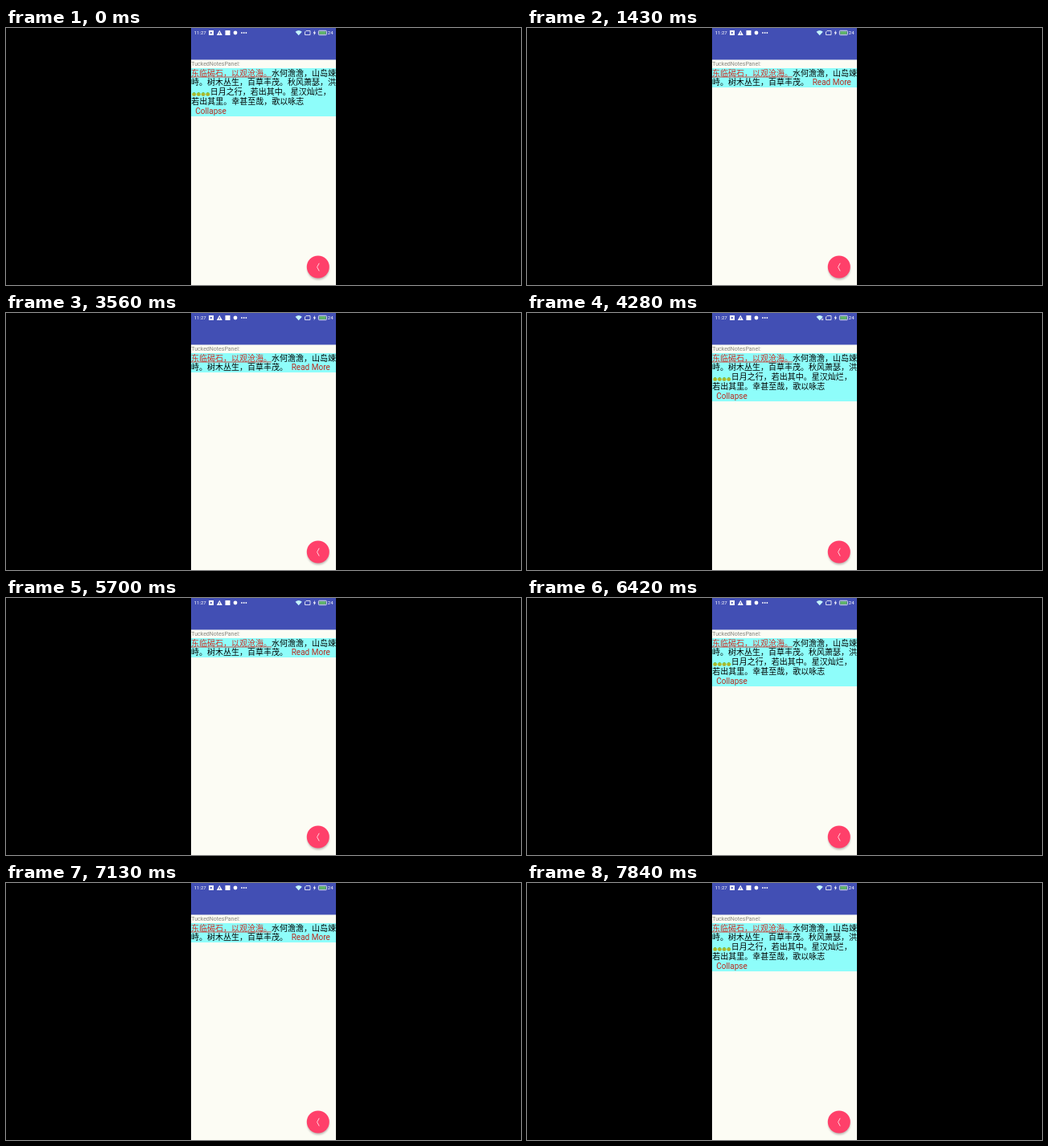
An HTML page for the animation above (8 s loop, 640 by 320 pixels).

```html
<!DOCTYPE html>
<html lang="zh-CN">
<head>
<meta charset="utf-8">
<title>Expandable text</title>
<style>
  html, body { margin: 0; width: 100%; height: 100%; overflow: hidden; background: #000; }
  svg { display: block; width: 100%; height: 100%; }
  text { font-family: Roboto, "Noto Sans CJK SC", "Noto Sans CJK", sans-serif; }
  .poem { font-size: 10px; fill: #000; font-family: "Noto Sans CJK SC", "Noto Sans CJK", sans-serif; }
  .link { fill: #cc2f28; }
  .toggle { font-size: 10px; fill: #b82a20; }
  .status { font-size: 6px; fill: #fff; }
  .line { fill: none; stroke: #fff; stroke-width: .8; }

  .expanded { animation: expanded 8s step-end infinite; }
  .collapsed { animation: collapsed 8s step-end infinite; }
  .traffic { animation: traffic 8s step-end infinite; }

  @keyframes expanded {
    0%, 53.5%, 80.25%, 98%, 100% { opacity: 1; }
    17.875%, 71.25%, 89.125% { opacity: 0; }
  }
  @keyframes collapsed {
    0%, 53.5%, 80.25%, 98%, 100% { opacity: 0; }
    17.875%, 71.25%, 89.125% { opacity: 1; }
  }
  @keyframes traffic {
    0%, 62.375%, 100% { opacity: 0; }
    53.5% { opacity: 1; }
  }
</style>
</head>
<body>
<svg viewBox="0 0 640 320">
  <defs>
    <filter id="soft" x="-30%" y="-30%" width="160%" height="160%">
      <feGaussianBlur stdDeviation="1.2"/>
    </filter>
    <g id="emoji">
      <ellipse cx="2.9" cy="3.6" rx="2.6" ry="2.2" fill="#b9c832"/>
      <path d="M.8 2.6Q2.9 -.6 5 2.6Z" fill="#6fae35"/>
      <path d="M1.5 4.5h2.8" stroke="#8b7a22" stroke-width=".7"/>
    </g>
  </defs>

  <rect width="640" height="320" fill="#000"/>
  <rect x="230" width="180" height="320" fill="#fcfcf4"/>
  <rect x="230" width="180" height="39.5" fill="#424fb4"/>

  <!-- Status bar -->
  <text class="status" x="233.7" y="8.2">11:27</text>
  <g fill="#fff">
    <rect x="252" y="3" width="6" height="6"/>
    <path d="M265.3 2.8l3.5 6.2h-7z"/>
    <rect x="272.5" y="3" width="6" height="6"/>
    <circle cx="285" cy="6" r="2.4"/>
    <circle cx="293" cy="6" r=".9"/>
    <circle cx="295.7" cy="6" r=".9"/>
    <circle cx="298.4" cy="6" r=".9"/>
    <path d="M384 2.8l-2.4 3.6h1.5l-.5 2.8 2.5-3.8h-1.6z"/>
    <path d="M359.6 4.8q4.1-3.6 8.2 0L363.7 9.2z" fill="#c4f3fa"/>
  </g>
  <path d="M254 4.4l2.6 1.6-2.6 1.6z" fill="#424fb4"/>
  <path d="M265.3 5v2.8" stroke="#424fb4" stroke-width=".8"/>
  <path class="line traffic" d="M366.2 6.8v2.4M367.7 6.8v2.4"/>
  <path class="line" d="M373 3.5h5v5h-6.5v-3.5z"/>
  <rect class="line" x="388.4" y="3.3" width="10" height="5.4" rx="1"/>
  <rect x="389.3" y="4.2" width="8.2" height="3.6" fill="#63b968"/>
  <text class="status" x="399.8" y="8.2">24</text>

  <text x="230.3" y="47.2" font-size="7" fill="#85857f">TuckedNotesPanel:</text>

  <g class="expanded">
    <rect x="230" y="50" width="180" height="60" fill="#8efdfa"/>
    <text class="poem" x="230" y="71.4">峙。树木丛生，百草丰茂。秋风萧瑟，洪</text>
    <use href="#emoji" x="230.8" y="79"/>
    <use href="#emoji" x="236.5" y="79"/>
    <use href="#emoji" x="242.2" y="79"/>
    <use href="#emoji" x="247.9" y="79"/>
    <text class="poem" x="253.7" y="83.2">日月之行，若出其中。星汉灿烂，</text>
    <text class="poem" x="230.3" y="95.1">若出其里。幸甚至哉，歌以咏志</text>
    <text class="toggle" x="235.2" y="107">Collapse</text>
  </g>

  <g class="collapsed">
    <rect x="230" y="50" width="180" height="24" fill="#8efdfa"/>
    <text class="poem" x="230" y="71.4">峙。树木丛生，百草丰茂。</text>
    <text class="toggle" x="354.7" y="71.2">Read More</text>
  </g>

  <text class="poem" y="59.6"><tspan class="link" x="230">东临碣石，以观沧海。</tspan><tspan x="330">水何澹澹，山岛竦</tspan></text>
  <rect class="link" x="230" y="60.6" width="100" height=".8"/>

  <!-- Floating button -->
  <circle cx="388" cy="300" r="13.6" fill="#6b5b5b" opacity=".4" filter="url(#soft)"/>
  <circle cx="387.8" cy="297.5" r="14" fill="#ff406a"/>
  <path d="M389.2 292.8l-2.6 4.9 2.6 4.9" fill="none" stroke="#ffd3dc" stroke-width="1"/>
</svg>
</body>
</html>
```
